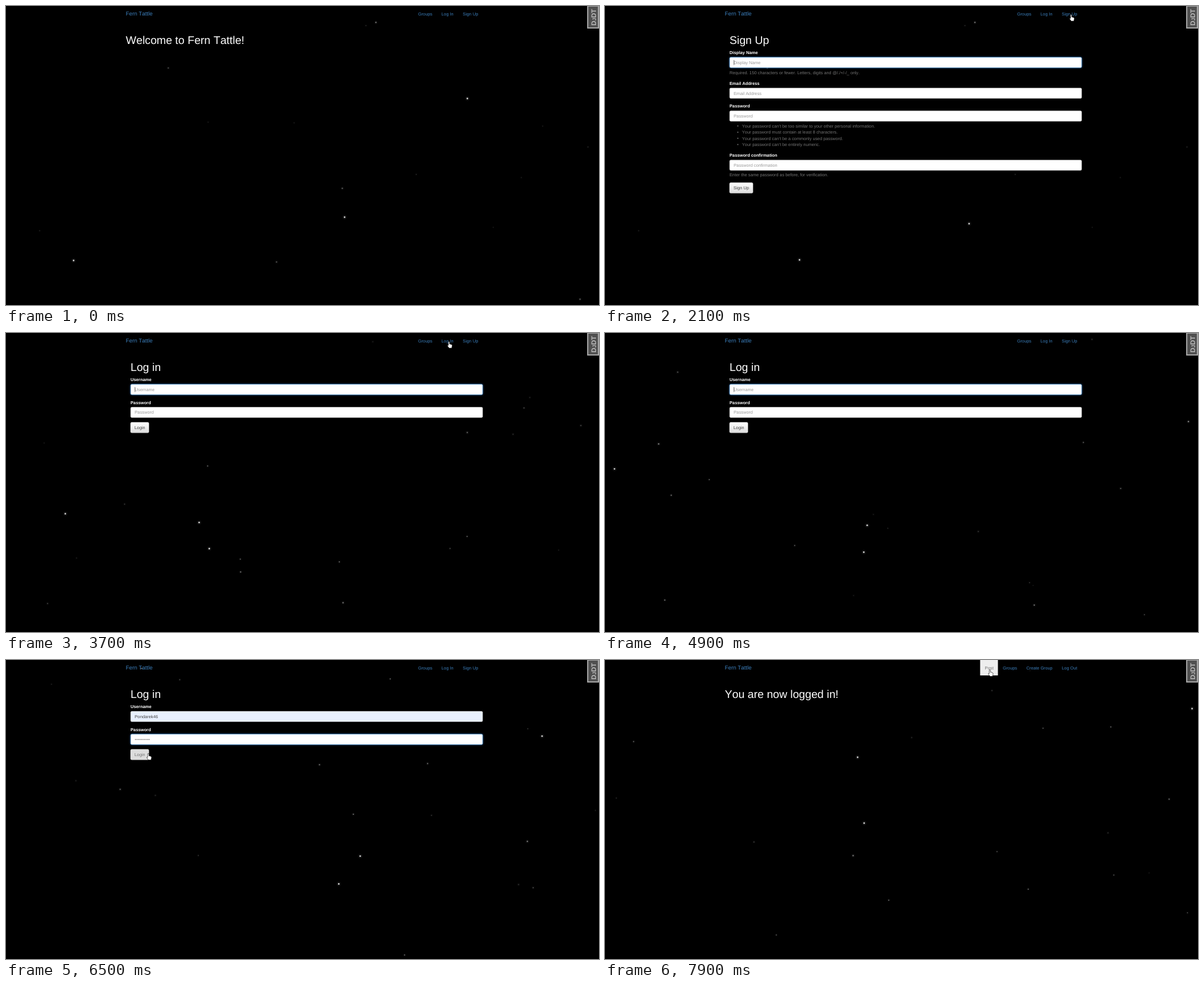
Animation, 1000 px wide and 504 px high, one loop 8000 ms. Source, as an HTML page with a canvas:

```html
<!DOCTYPE html>
<html lang="en">
<head>
<meta charset="utf-8">
<title>Fern Tattle</title>
<style>
  html, body { margin: 0; width: 100%; height: 100%; overflow: hidden; background: #000; }
  canvas, svg { position: absolute; left: 0; top: 0; }
  text {
    font: 7.29px "Liberation Sans", Arial, sans-serif;
    font-kerning: none;
    text-rendering: geometricPrecision;
    white-space: pre;
  }
  .brand { font-size: 9.375px; }
  .link { fill: #3b7ebb; }
  .title { font-size: 18.75px; fill: #fff; }
  .label { font-weight: bold; fill: #fff; }
  .help { fill: #737373; }
  .hint { fill: #999; }
  .dark { fill: #444; }
  .badge { font-size: 11.3px; font-weight: bold; fill: #bbb; }
  .badge tspan { font-size: 8.5px; }
  .focus { filter: drop-shadow(0 0 1.5px #2a66a5); }
</style>
</head>
<body>
<canvas id="sky" width="1000" height="504"></canvas>
<svg id="ui" width="1000" height="504"></svg>
<script>
const W = 1000, H = 504, LOOP = 8000, STEP = 100;
const SIGNUP = 2100, LOGIN = 3600, FILLED = 5600, HOME = 7300;
const HOLDS = [[1800, SIGNUP], [5400, FILLED], [7000, HOME]];
const SITE = 'Fern Tattle', USER = 'Pondarek46';
const ctx = document.getElementById('sky').getContext('2d');
const ui = document.getElementById('ui');

const text = (x, y, cls, str) => `<text x="${x}" y="${y}" class="${cls}">${str}</text>`;
const rect = (x, y, w, h, fill, more = '') =>
  `<rect x="${x}" y="${y}" width="${w}" height="${h}" fill="${fill}" ${more}/>`;
const dot = (x, y, r, cls) => `<circle cx="${x}" cy="${y}" r="${r}" class="${cls}"/>`;
const field = (y, focus, fill, content) =>
  rect(210.2, y, 593.6, 17.4, fill,
    `rx="2" stroke="${focus ? '#66afe9' : '#ccc'}" stroke-width=".6" class="${focus ? 'focus' : ''}"`) + content;
const emptyField = (y, hint, focus, caret) =>
  field(y, focus, '#fff', text(217, y + 11.3, 'hint', hint) + (caret ? rect(217, y + 4.5, 0.6, 8.5, '#222') : ''));
const labelled = (y, name, focus, caret) => text(210, y, 'label', name) + emptyField(y + 5.5, name, focus, caret);
const button = (y, w, str, hover) =>
  rect(210, y, w, 17.6, hover ? '#ddd' : 'url(#shine)', 'rx="2" stroke="#ccc" stroke-width=".5"') +
  text(216.8, y + 11.3, hover ? 'help' : 'dark', str);

function signUpPage(t, caret) {
  const rules = ['can’t be too similar to your other personal information.', 'must contain at least 8 characters.',
    'can’t be a commonly used password.', 'can’t be entirely numeric.'];
  return text(210, 64, 'title', 'Sign Up') +
    labelled(81, 'Display Name', true, caret) +
    text(210, 114.6, 'help', 'Required. 150 characters or fewer. Letters, digits and @/./+/-/_ only.') +
    labelled(132.8, 'Email Address') +
    labelled(171.3, 'Password') +
    rules.map((rule, i) => dot(224, 202.3 + i * 10.4, 1, 'help') +
      text(231, 204.7 + i * 10.4, 'help', 'Your password ' + rule)).join('') +
    labelled(254.2, 'Password confirmation') +
    text(210, 287.4, 'help', 'Enter the same password as before, for verification.') +
    button(297.8, 39.5, 'Sign Up');
}

function loginPage(t, caret, hover) {
  const filled = t >= FILLED;
  const typed = Math.max(0, Math.min(10, Math.floor((t - FILLED) / 60)));
  const bullets = Array.from({ length: typed }, (_, i) => dot(218.3 + i * 2.55, 134, 0.8, 'dark')).join('');
  return text(210, 64, 'title', 'Log in') +
    text(210, 81, 'label', 'Username') +
    (filled ? field(86.5, false, '#e8f0fe', text(217, 97.8, 'dark', USER))
      : emptyField(86.5, 'Username', true, caret)) +
    text(210, 119.6, 'label', 'Password') +
    (typed ? field(125.1, true, '#fff', bullets) : emptyField(125.1, 'Password', filled)) +
    button(150.6, 31, 'Login', hover);
}

const GUEST = [[695, 24, 'Groups'], [734.3, 21, 'Log In'], [770.3, 26, 'Sign Up']];
const MEMBER = [[640.6, 15, 'Post'], [671, 24, 'Groups'], [710.5, 44, 'Create Group'], [770.3, 26, 'Log Out']];

// Each page lists its few bright stars as x, y and velocity per second; the others are scattered by seed.
const pages = [
  { from: 0, faint: 14, links: GUEST, body: () => text(202, 64, 'title', `Welcome to ${SITE}!`),
    bright: [[114, 429, 59, 33], [571, 356, 122, 75], [778, 156, 84, 95]] },
  { from: SIGNUP, faint: 9, links: GUEST, body: signUpPage,
    bright: [[614, 367, 70, -60], [328, 428, -50, 80]] },
  { from: LOGIN, faint: 18, links: GUEST, body: loginPage,
    bright: [[335, 363, 78, 5], [107, 311, -70, -63], [316, 319, 97, 4]] },
  { from: HOME, faint: 18, links: MEMBER, body: () => text(202, 64, 'title', 'You are now logged in!'),
    bright: [[395, 305, 70, -50], [960, 46, 50, 60], [474, 140, -80, 40]] }
];

const noise = n => { const s = Math.sin(n * 127.1 + 3) * 43758.5453; return s - Math.floor(s); };
const wrap = (v, size) => ((v % size) + size) % size;

function star(x, y, r, alpha) {
  for (const [radius, a] of [[r * 2.6, alpha * 0.07], [r, alpha]]) {
    ctx.fillStyle = `rgba(255,255,255,${a})`;
    ctx.beginPath();
    ctx.arc(x, y, radius, 0, 7);
    ctx.fill();
  }
}

function drawSky(page, t) {
  const s = (t - page.from) / 1000;
  ctx.clearRect(0, 0, W, H);
  for (const [x, y, vx, vy] of page.bright) star(wrap(x + vx * s, W), wrap(y + vy * s, H), 1.4, 0.8);
  for (let i = 0; i < page.faint; i++) {
    const rnd = k => noise(page.from / 100 + i * 7 + k);
    const angle = rnd(0) * 2 * Math.PI, dist = (50 + 90 * rnd(1)) * s;
    const twinkle = 0.3 + 0.2 * Math.sin(s * 2 + rnd(4) * 6);
    star(wrap(rnd(2) * W + Math.cos(angle) * dist, W), wrap(rnd(3) * H + Math.sin(angle) * dist, H),
      0.8 + 0.5 * rnd(5), twinkle);
  }
}

// Pointer moves: start and end time, then the stops it glides between.
const SIGNUP_LINK = [785, 14], LOGIN_LINK = [746, 14], LOGIN_BUTTON = [239, 157], POST_LINK = [648, 16];
const moves = [
  [1100, 1600, [690, 190], SIGNUP_LINK],
  [2500, 2900, SIGNUP_LINK, LOGIN_LINK],
  [3800, 4200, LOGIN_LINK, [420, 90]],
  [6000, 6300, [300, 132], LOGIN_BUTTON],
  [HOME, 7700, LOGIN_BUTTON, POST_LINK]
];

function pointerAt(t) {
  const move = moves.filter(m => t >= m[0]).pop();
  if (!move || (t >= 4200 && t < 6000)) return null;
  const [start, end, [x0, y0], [x1, y1]] = move;
  const k = Math.min(1, (t - start) / (end - start)), ease = k * k * (3 - 2 * k);
  return { x: x0 + (x1 - x0) * ease, y: y0 + (y1 - y0) * ease };
}

const HAND = 'M0 1Q1 -.5 2 1V4.5L5 5.2Q6.6 5.6 6.4 7.5L5.6 11.5H1.2L-1.6 7.6Q-2 6.2 0 7Z';
const ARROW = 'M0 0V10L2.4 8L4 11.5L5.4 10.8L4 7.5H7Z';
const SHINE = `<defs><linearGradient id="shine" x2="0" y2="1"><stop stop-color="#fff"/>
  <stop offset="1" stop-color="#dcdcdc"/></linearGradient></defs>`;
const BADGE = rect(981, 0, 18, 37, '#505050', 'stroke="#a5a5a5" stroke-width="2"') +
  '<text transform="translate(994.5 33) rotate(-90)" class="badge">D<tspan>J</tspan>DT</text>';

function drawPage(page, t) {
  const pointer = pointerAt(t);
  const over = pointer && pointer.y < 26 && page.links.find(([x, w]) => pointer.x > x - 8 && pointer.x < x + w + 7);
  const overButton = page.body === loginPage && pointer && pointer.y > 150 && pointer.x < 241;
  // A fresh page shows no hover until the pointer moves.
  const fresh = page.links === GUEST && page.from > 0 && t - page.from < 400;
  const caret = Math.floor((t - page.from) / 500) % 2 === 0;
  const nav = page.links.map(([x, w, str]) => over && !fresh && over[2] === str
    ? rect(x - 8, 0, w + 15, 26, '#eee') + text(x, 15.8, 'help', str)
    : text(x, 15.8, 'link', str)).join('');
  const cursor = pointer ? `<path d="${over || overButton ? HAND : ARROW}" fill="#fff" stroke="#000" stroke-width=".6"
    transform="translate(${pointer.x} ${pointer.y})"/>` : '';
  ui.innerHTML = SHINE + text(202, 16.3, 'brand link', SITE) + nav + page.body(t, caret, overButton) + BADGE + cursor;
}

let shown = -1;
function tick() {
  let t = Math.floor(performance.now() % LOOP / STEP) * STEP;
  for (const [start, end] of HOLDS) if (t > start && t < end) t = start;
  if (t !== shown) {
    shown = t;
    const page = pages.filter(p => t >= p.from).pop();
    drawSky(page, t);
    drawPage(page, t);
  }
  requestAnimationFrame(tick);
}
tick();
</script>
</body>
</html>
```
